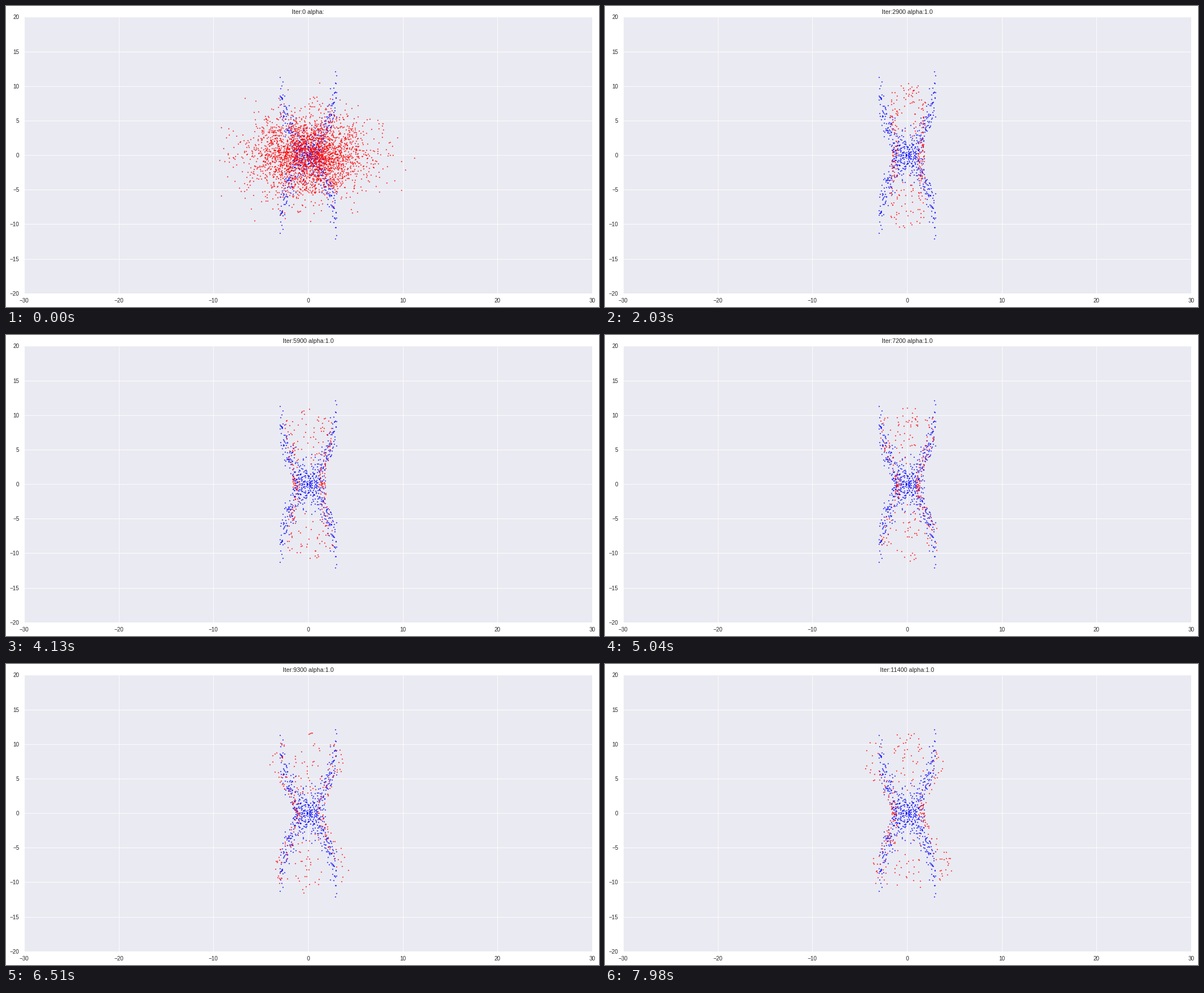
A matplotlib script for the animation above (8000 ms loop, 1050 by 533 pixels).

```python
import numpy as np
import matplotlib.pyplot as plt
from matplotlib.animation import FuncAnimation

W, H, DPI = 1050, 533, 100
FRAMES, LOOP_MS = 115, 8000
BATCH = 256
PX = 72 / DPI  # points per pixel
INK = "#262626"
LEFT, RIGHT, TOP, BOTTOM = 32, 1038, 19.4, 508.8

plt.rcParams["font.family"] = "Liberation Sans"


def curve_points():
    """Noisy parabola and its mirror image."""
    rng = np.random.default_rng(4)
    x = np.linspace(-3, 3, 300)
    y = x**2 + rng.normal(0, 1.5, x.size)
    half = np.column_stack([x, y])
    return np.vstack([half, half * (1, -1)])


def start_cloud():
    rng = np.random.default_rng(11)
    return rng.normal(0, 1, (2800, 2)) * (3.0, 2.9)


def shape(step):
    """Waist, height and the reach of the two diagonal pairs of arms."""
    growth = 1 - np.exp(-step / 6)
    ramp = np.clip((step - 29) / 70, 0, 1)**1.6
    waist = growth * (1.35 + 0.22 * np.cos(2 * np.pi * (step - 114) / 28.3))
    height = growth * (10.6 + 1.2 * ramp)
    spread = growth * (1.7 + 2.1 * ramp)
    twist = 0.6 * ramp * np.cos(np.pi * (step - 84) / 36)**2
    return waist, height, spread - twist, spread + twist


def batch(step):
    """One generated batch: curved walls plus a looser fill above and below."""
    rng = np.random.default_rng(500 + step)
    waist, height, rising, falling = shape(step)

    n = int(BATCH * 0.7)
    side, half = rng.choice([-1, 1], (2, n))
    reach = np.where(side == half, rising, falling)
    level = 0.88 * rng.random(n)**1.5
    bend = np.minimum(level / 0.55, 1)**1.4
    x = waist + (reach - waist) * bend
    x *= 1.1 - 0.45 * rng.random(n)**1.3
    wall = np.column_stack([side * x + 0.08, half * level * height])

    m = BATCH - n
    level = 0.25 + 0.75 * rng.random(m)
    edge = min(1.2 * waist, 1.8) * np.sqrt(1 - 0.6 * level**4)
    fill = np.column_stack([rng.uniform(-1, 1, m) * edge,
                            rng.choice([-1, 1], m) * level * height])
    return np.vstack([wall, fill])


fig = plt.figure(figsize=(W / DPI, H / DPI), dpi=DPI, facecolor="white")
ax = fig.add_axes([LEFT / W, 1 - BOTTOM / H, (RIGHT - LEFT) / W, (BOTTOM - TOP) / H],
                  facecolor="#EAEAF2")
ax.set(xlim=(-30, 30), ylim=(-20, 20),
       xticks=range(-30, 31, 10), yticks=range(-20, 21, 5))
ax.grid(color="white", lw=0.9 * PX)
ax.set_axisbelow(True)
ax.tick_params(length=0, pad=8.6 * PX, labelsize=9.9 * PX, labelcolor=INK)
for spine in ax.spines.values():
    spine.set(color="white", lw=1.1 * PX)
title = ax.set_title("", fontsize=10.8 * PX, color=INK, pad=5.4 * PX)

dot = dict(s=(1.9 * PX)**2, linewidths=0)
ax.scatter(*curve_points().T, color="blue", zorder=2, **dot)
cloud = start_cloud()
red = ax.scatter(*cloud.T, color="red", zorder=3, **dot)


def update(step):
    red.set_offsets(batch(step) if step else cloud)
    title.set_text(f"Iter:{100 * step} alpha:" + ("1.0" if step else ""))
    return red, title


anim = FuncAnimation(fig, update, frames=FRAMES, interval=LOOP_MS / FRAMES,
                     repeat=True, repeat_delay=0, blit=False)
plt.show()
```
